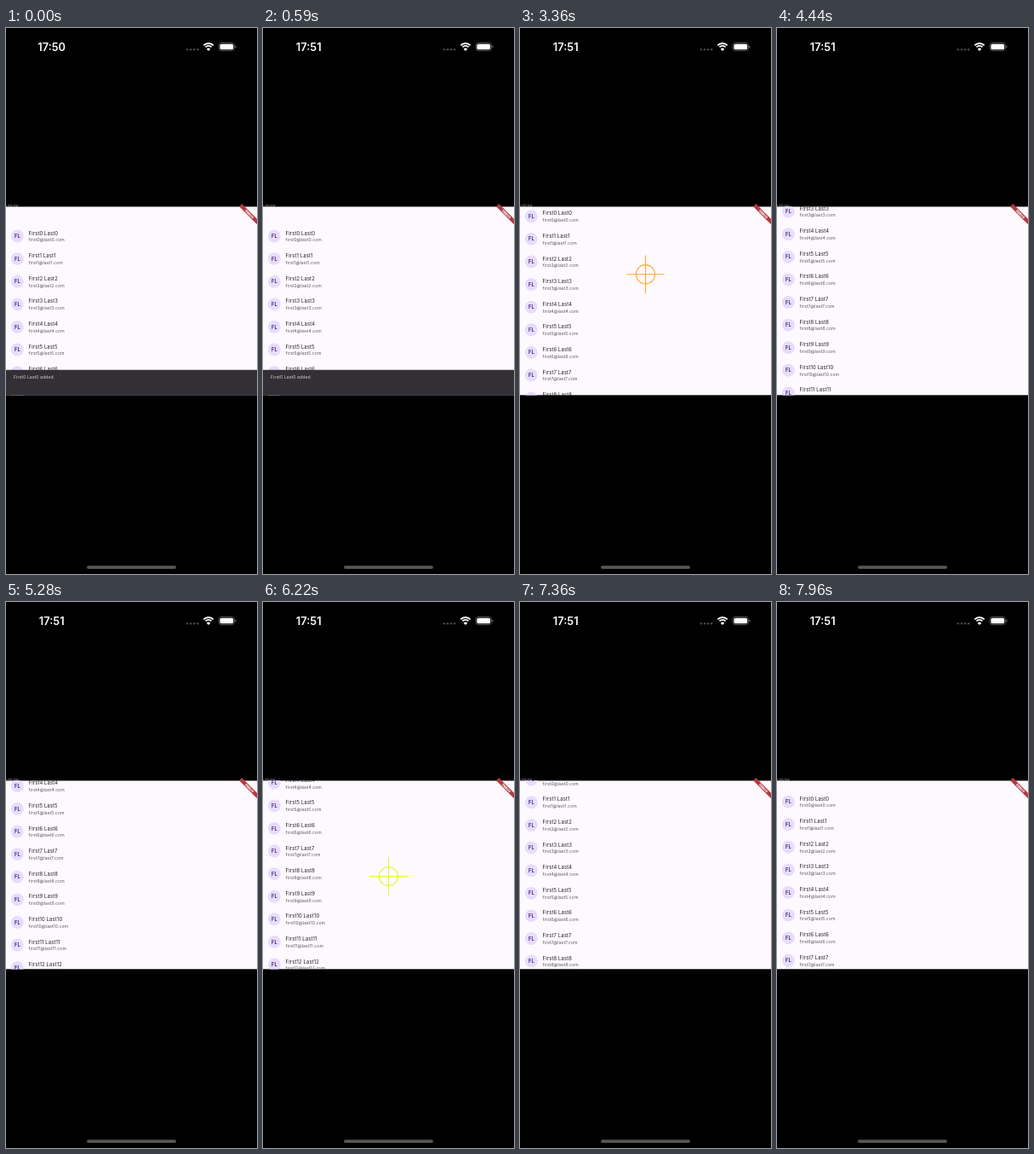
Write an HTML page with a canvas that moves like this. It is 295 px wide and 640 px high and loops after 8000 ms.

```html
<!DOCTYPE html>
<html lang="en">
<head>
<meta charset="utf-8">
<style>
html, body { margin: 0; width: 100%; height: 100%; overflow: hidden; background: #000; }
canvas { display: block; width: 295px; height: 640px; }
</style>
</head>
<body>
<canvas id="stage"></canvas>
<script>
const canvas = document.getElementById('stage');
const ctx = canvas.getContext('2d');
const ratio = window.devicePixelRatio || 1;
canvas.width = 295 * ratio;
canvas.height = 640 * ratio;

const LOOP = 8000, TOP = 209.3, HEIGHT = 221.3, ROW = 26.6;
const TRAVEL = 73.75, SLOP = 8, FAR = 138.2;

// The screen refreshes in bursts: [first, last, steps].
const bursts = [
  [2830, 3360, 6], [3360, 3580, 3], [3820, 3820, 1], [4080, 4800, 7], [4920, 5640, 7],
  [5760, 5880, 2], [6120, 6860, 8], [6980, 6980, 1], [7120, 7120, 1], [7360, 7480, 2],
  [7700, 7700, 1], [7840, 7960, 2]
];
const ticks = [0, 590, 2460, 2650];
for (const [first, last, steps] of bursts)
  for (let i = 0; i < steps; i++)
    ticks.push(first + (steps > 1 ? (last - first) * i / (steps - 1) : 0));

const drags = [
  { start: 2830, end: 4080, dir: -1, from: 0, to: FAR, rate: 2.5, hue: 35 },
  { start: 6100, end: 7028, dir: 1, from: FAR, to: 0, rate: 2.13, hue: 70 }
];

const dragged = (d, t) => TRAVEL * Math.min(1, (t - d.start) / (d.end - d.start));

function scrollAt(t) {
  const d = drags.filter(d => t >= d.start).pop();
  if (!d) return 0;
  const held = d.from - d.dir * Math.max(0, dragged(d, t) - SLOP);
  if (t < d.end) return held;
  return d.to + (held - d.to) * Math.exp(-d.rate * (t - d.end) / 1000);
}

function text(str, x, y, size, color, { weight = 400, align = 'left', spacing = 0 } = {}) {
  ctx.font = `${weight} ${size}px Inter, sans-serif`;
  ctx.letterSpacing = spacing + 'px';
  ctx.textAlign = align;
  ctx.fillStyle = color;
  ctx.fillText(str, x, y);
}

function box(x, y, w, h, r, color) {
  ctx.fillStyle = color;
  ctx.beginPath();
  ctx.roundRect(x, y, w, h, r);
  ctx.fill();
}

function disc(x, y, r, color) {
  ctx.fillStyle = color;
  ctx.beginPath();
  ctx.arc(x, y, r, 0, 2 * Math.PI);
  ctx.fill();
}

function phone(clock) {
  text(clock, 53.7, 26.6, 12.8, '#fff', { weight: 600, align: 'center' });
  for (let i = 0; i < 4; i++) disc(212.9 + i * 4.1, 25.2, 1.25, '#48484a');

  ctx.strokeStyle = '#fff';
  ctx.lineWidth = 1.8;
  for (const r of [8, 5]) {
    ctx.beginPath();
    ctx.arc(238, 26, r, -Math.PI * .75, -Math.PI * .25);
    ctx.stroke();
  }
  ctx.fillStyle = '#fff';
  ctx.beginPath();
  ctx.moveTo(238, 27);
  ctx.arc(238, 27, 3.2, -Math.PI * .75, -Math.PI * .25);
  ctx.fill();

  ctx.strokeStyle = '#69696b';
  ctx.lineWidth = .8;
  ctx.beginPath();
  ctx.roundRect(250.1, 17.4, 18.4, 9.2, 3);
  ctx.stroke();
  box(251.4, 18.7, 15.8, 6.6, 1.9, '#fff');
  box(269.3, 20.5, 1.1, 3, .6, '#69696b');
  box(95, 630.2, 105, 3.8, 1.9, '#555557');
}

function list(scroll) {
  ctx.save();
  ctx.beginPath();
  ctx.rect(0, TOP, 295, HEIGHT);
  ctx.clip();
  ctx.fillStyle = '#fdf9fe';
  ctx.fillRect(0, TOP, 295, HEIGHT);
  for (let i = 0; i < 14; i++) {
    const y = 244 + i * ROW - scroll;
    disc(13.3, y, 7.4, '#e7dcfd');
    text('FL', 13.4, y + 2.1, 5.8, '#21005d', { weight: 500, align: 'center', spacing: .06 });
    text(`First${i} Last${i}`, 26.6, y - 1.4, 5.8, '#1d1b20', { spacing: .18 });
    text(`first${i}@last${i}.com`, 26.6, y + 6.4, 5.1, '#5a5660', { spacing: .08 });
  }
  ctx.restore();
}

function ribbon() {
  ctx.save();
  ctx.translate(295, TOP);
  ctx.rotate(Math.PI / 4);
  box(-14.8, 10.3, 29.6, 4.5, 0, '#b23a42');
  text('DEBUG', 0, 13.9, 3.7, '#fff', { weight: 900, align: 'center' });
  ctx.restore();
}

function crosshair(y, hue) {
  const x = 147.5, r = 11.1;
  ctx.strokeStyle = `hsla(${hue}, 100%, 50%, .8)`;
  ctx.lineWidth = 1.1;
  ctx.beginPath();
  ctx.arc(x, y, r, 0, 2 * Math.PI);
  ctx.moveTo(x, y - 2 * r);
  ctx.lineTo(x, y + 2 * r);
  ctx.moveTo(x - 2 * r, y);
  ctx.lineTo(x + 2 * r, y);
  ctx.stroke();
}

function draw(now) {
  const time = now % LOOP;
  const t = ticks.filter(tick => tick <= time + .01).pop();
  ctx.setTransform(ratio, 0, 0, ratio, 0, 0);
  ctx.fillStyle = '#000';
  ctx.fillRect(0, 0, 295, 640);
  phone(t < 590 ? '17:50' : '17:51');

  if (t >= 2460 && t < 2650) {
    text('UserListTile Widget Test', 0, 209.3, 3.6, '#aaa');
    text('Test starting...', 147.5, 325.3, 14.75, '#917fff', { align: 'center', spacing: -.1 });
  } else {
    text('ListView', 0, 209.5, 3.7, '#999');
    list(scrollAt(t));
    ribbon();
    if (t < 2460) {
      box(0, 400.8, 295, 29.8, 0, '#322f35');
      text('First0 Last0 added.', 9, 411, 5.1, '#d8d2da', { spacing: .09 });
    }
    for (const d of drags)
      if (t >= d.start && t < d.end) crosshair(320 + d.dir * dragged(d, t), d.hue);
  }
  requestAnimationFrame(loop);
}

const began = performance.now();
function loop() { draw(performance.now() - began); }
loop();
</script>
</body>
</html>
```
